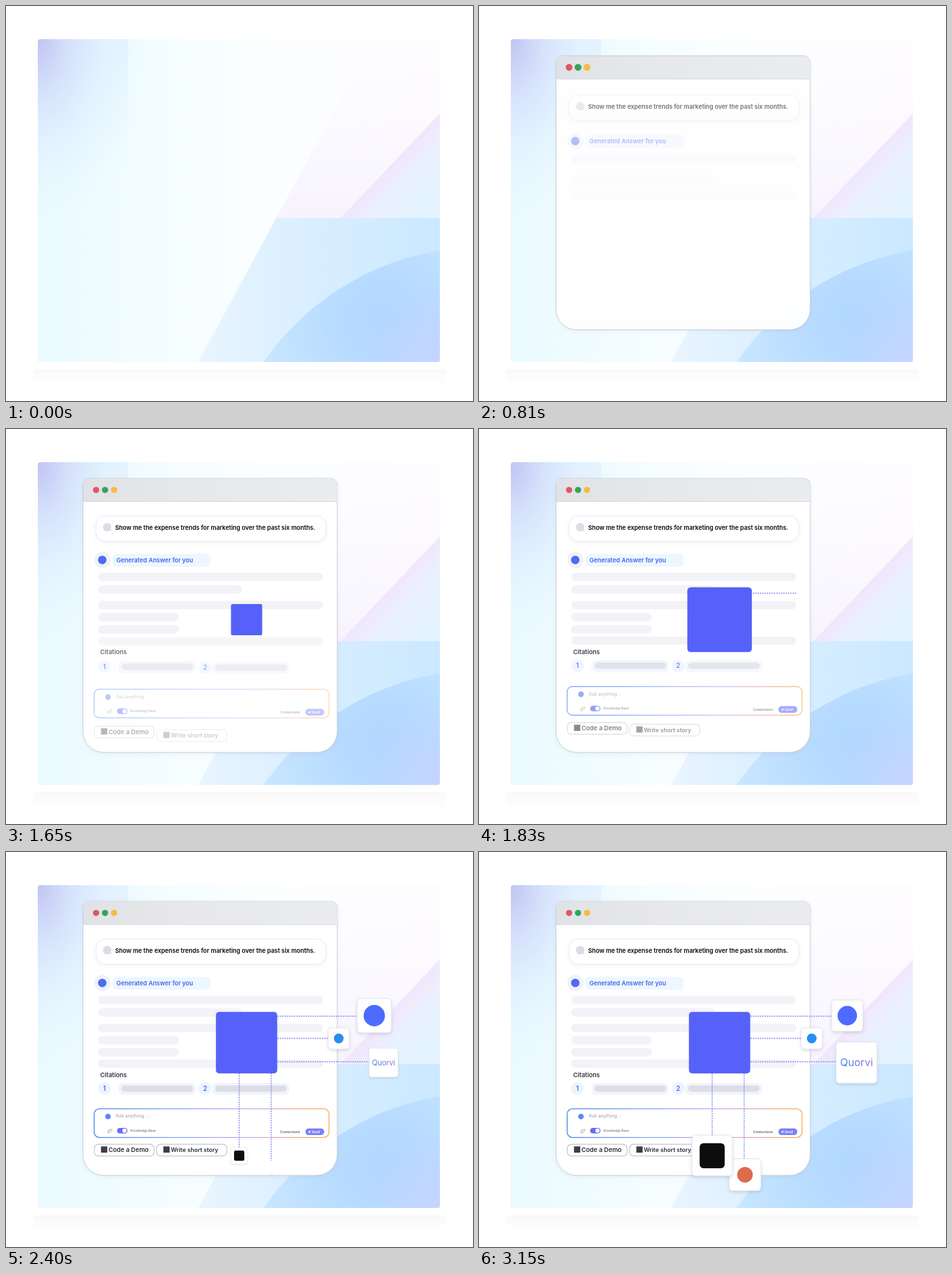
An HTML page for the animation above (3.18 s loop, 719 px wide and 607 px high).

```html
<!DOCTYPE html>
<html lang="en">
<head>
<meta charset="utf-8">
<title>Assistant window</title>
<style>
html, body { margin: 0; width: 100%; height: 100%; overflow: hidden; background: #fff; }
svg { display: block; width: 719px; height: 607px; font-family: Inter, "Open Sans", sans-serif; font-weight: 600; }
</style>
</head>
<body>
<svg id="stage" viewBox="0 0 719 607">
  <defs>
    <clipPath id="panelClip"><rect x="49" y="51" width="619" height="496" rx="4"/></clipPath>
    <linearGradient id="base"><stop stop-color="#eafaff"/><stop offset=".3" stop-color="#f3fdff"/><stop offset=".55" stop-color="#fbfeff"/><stop offset="1" stop-color="#fefcff"/></linearGradient>
    <radialGradient id="corner" gradientUnits="userSpaceOnUse" cx="0" cy="0" r="1" gradientTransform="translate(49 51) scale(170 290)">
      <stop stop-color="#c0c4f3"/><stop offset=".3" stop-color="#d5e0fb" stop-opacity=".9"/><stop offset=".6" stop-color="#dff0ff" stop-opacity=".6"/><stop offset="1" stop-color="#e6f8ff" stop-opacity="0"/>
    </radialGradient>
    <linearGradient id="strip" x2="0" y2="1"><stop stop-color="#e0edfe" stop-opacity=".75"/><stop offset="1" stop-color="#e9f9ff" stop-opacity="0"/></linearGradient>
    <linearGradient id="blush" x2="0" y2="1"><stop stop-color="#fcf9ff" stop-opacity="0"/><stop offset="1" stop-color="#f7f3fe"/></linearGradient>
    <linearGradient id="wedge" gradientUnits="userSpaceOnUse" x1="591" y1="245" x2="650" y2="301"><stop stop-color="#f1e6fc"/><stop offset=".45" stop-color="#eaf1fe"/><stop offset="1" stop-color="#e3f3ff"/></linearGradient>
    <linearGradient id="lower"><stop stop-color="#e9f5ff"/><stop offset=".5" stop-color="#d8eeff"/><stop offset="1" stop-color="#cbe8ff"/></linearGradient>
    <radialGradient id="disc" gradientUnits="userSpaceOnUse" cx="585" cy="485" r="200"><stop stop-color="#b1d7ff"/><stop offset=".35" stop-color="#b7dbff"/><stop offset="1" stop-color="#c9e7ff"/></radialGradient>
    <radialGradient id="lilac" gradientUnits="userSpaceOnUse" cx="668" cy="547" r="130"><stop stop-color="#c6d3ff"/><stop offset="1" stop-color="#c0d6ff" stop-opacity="0"/></radialGradient>
    <linearGradient id="floor" x2="0" y2="1"><stop stop-color="#f9f9f9"/><stop offset="1" stop-color="#fff"/></linearGradient>
    <linearGradient id="titleBar"><stop stop-color="#e0e2e5"/><stop offset=".4" stop-color="#e6e8ea"/><stop offset="1" stop-color="#ebecef"/></linearGradient>
    <linearGradient id="rim"><stop stop-color="#3f7ff0"/><stop offset=".35" stop-color="#7aa0fa"/><stop offset=".65" stop-color="#c9a4f2"/><stop offset="1" stop-color="#f5a94a"/></linearGradient>
    <linearGradient id="wordInk"><stop stop-color="#4285f4"/><stop offset=".6" stop-color="#8474cf"/><stop offset="1" stop-color="#7a80dd"/></linearGradient>
    <filter id="soft" x="-30%" y="-30%" width="160%" height="170%"><feDropShadow dx="0" dy="2" stdDeviation="2.5" flood-color="#5a6080" flood-opacity=".22"/></filter>
    <filter id="faint" x="-10%" y="-30%" width="120%" height="180%"><feDropShadow dx="0" dy="2" stdDeviation="3" flood-color="#8088b0" flood-opacity=".12"/></filter>
  </defs>
  <rect x="42" y="558" width="635" height="26" rx="4" fill="url(#floor)"/>
  <g clip-path="url(#panelClip)">
    <rect x="49" y="51" width="619" height="496" fill="url(#base)"/>
    <rect x="49" y="51" width="139" height="200" fill="url(#strip)"/>
    <rect x="49" y="51" width="200" height="300" fill="url(#corner)"/>
    <path d="M416 326 565 51H668V326Z" fill="url(#blush)"/>
    <path d="M515 326 668 165V326Z" fill="url(#wedge)"/>
    <path d="M296 547 416 326H668V547Z" fill="url(#lower)"/>
    <circle cx="735" cy="782" r="412" fill="url(#disc)"/>
    <rect x="538" y="417" width="130" height="130" fill="url(#lilac)"/>
  </g>
</svg>
<script>
const LOOP = 3180, STEP = 30;
const stage = document.getElementById('stage');
const parts = [];

function add(parent, tag, attrs, text) {
  const node = document.createElementNS('http://www.w3.org/2000/svg', tag);
  for (const key in attrs) node.setAttribute(key, attrs[key]);
  if (text) node.textContent = text;
  return parent.appendChild(node);
}
const group = (parent = stage) => add(parent, 'g', {});
const box = (parent, x, y, width, height, rx, fill, extra) =>
  add(parent, 'rect', { x, y, width, height, rx, fill, ...extra });
const dot = (parent, cx, cy, r, fill) => add(parent, 'circle', { cx, cy, r, fill });
const label = (parent, x, y, size, fill, text, extra) =>
  add(parent, 'text', { x, y, 'font-size': size, fill, ...extra }, text);

const progress = (t, start, span) => Math.min(1, Math.max(0, (t - start) / span));
const easeOut = p => 1 - (1 - p) ** 3;
const easeBack = p => 1 + 2.70158 * (p - 1) ** 3 + 1.70158 * (p - 1) ** 2;

// Slides up into place while fading in
function rise(start, distance = 30) {
  const g = group();
  parts.push(t => {
    const p = progress(t, start, 800);
    g.setAttribute('transform', `translate(0 ${distance * (1 - easeOut(p))})`);
    g.setAttribute('opacity', p);
  });
  return g;
}

// Scales up around (x, y) with an overshoot
function pop(parent, x, y, start, span) {
  const g = group(parent);
  parts.push(t => {
    const scale = easeBack(progress(t, start, span));
    g.setAttribute('visibility', scale > 0.001 ? 'visible' : 'hidden');
    g.setAttribute('transform', `translate(${x} ${y}) scale(${scale})`);
  });
  return g;
}

function grow(x, y, length, start, vertical) {
  const line = add(stage, 'line', { x1: x, y1: y, x2: x, y2: y, stroke: '#8b8df6', 'stroke-width': 1.6, 'stroke-dasharray': '2 1.6' });
  parts.push(t => {
    const reach = length * easeOut(progress(t, start, 400));
    line.setAttribute(vertical ? 'y2' : 'x2', (vertical ? y : x) + reach);
    line.setAttribute('visibility', reach ? 'visible' : 'hidden');
  });
}

function card(x, y, size, start) {
  const g = pop(stage, x, y, start, 750);
  box(g, -size / 2, -size / 2, size, size, 5, '#fff', { stroke: '#dfe1e8', 'stroke-width': .8, filter: 'url(#soft)' });
  return g;
}

// Window
const pane = group(), lights = group();
add(pane, 'path', { d: 'M118.5 86a10 10 0 0 1 10-10H500a10 10 0 0 1 10 10V465a32 32 0 0 1-32 32H150.5a32 32 0 0 1-32-32Z', fill: '#fff', stroke: '#c3c8d3', 'stroke-width': .9, filter: 'url(#faint)' });
add(pane, 'path', { d: 'M119 112V86a9.5 9.5 0 0 1 9.5-9.5H500a9.5 9.5 0 0 1 9.5 9.5V112Z', fill: 'url(#titleBar)' });
box(pane, 119, 111, 390.5, 1, 0, '#d6d9df');
parts.push(t => {
  const e = easeOut(progress(t, 210, 800));
  const shift = `translate(0 ${35 * (1 - e)})`;
  pane.setAttribute('transform', shift);
  pane.setAttribute('opacity', e);
  lights.setAttribute('transform', shift);
});
[['#e05766', 381], ['#35a35a', 450], ['#f8bb41', 501]].forEach(([color, start], i) =>
  dot(pop(lights, 138.7 + i * 13.8, 93.7, start, 600), 0, 0, 4.8, color));

// Question
const query = rise(360, 39);
box(query, 138.5, 133.5, 354, 39, 15, '#fff', { stroke: '#e9eaf3', filter: 'url(#faint)' });
add(query, 'path', { d: 'M159 154l3 2.5', stroke: '#d9dae6', 'stroke-width': 2 });
dot(query, 155.7, 150.8, 6.5, '#dcdce8');
label(query, 168, 154.6, 9.3, '#08080c', 'Show me the expense trends for marketing over the past six months.');

// Answer
const answer = rise(468, 34);
dot(answer, 148.5, 201.3, 12.5, '#f0f2f9');
dot(answer, 148.2, 201.2, 6.5, '#4f6bef');
box(answer, 164, 191.7, 151, 20, 6, '#edf7ff');
label(answer, 170, 204.8, 9.3, '#4661f1', 'Generated Answer for you');
[[221, 346, 490], [240.3, 221, 680], [264.3, 346, 685], [282.8, 124, 762], [301.6, 124, 830], [319, 346, 1100]]
  .forEach(([y, width, start]) => box(rise(start, 34), 142, y, width, 12.6, 6, '#f2f2f7'));

// Citations
label(rise(1075, 22), 145, 346, 9.5, '#34353f', 'Citations');
[[151.5, 173, 1160], [306.5, 317, 1230]].forEach(([x, left, start], i) => {
  const g = rise(start);
  dot(g, x, 363.5, 9.8, '#ecf4ff');
  label(g, x, 367, 10, '#4a63f0', String(i + 1), { 'text-anchor': 'middle' });
  box(g, left, 355, 119, 18, 7, '#f1f5fc');
  box(g, left + 5, 358.8, 110, 9.6, 4.8, '#dddde8');
});

// Prompt field
const prompt = rise(1300);
box(prompt, 135.7, 394.6, 361.6, 44, 8, '#fff', { stroke: 'url(#rim)', 'stroke-width': 1.3 });
dot(prompt, 157, 406.5, 4.3, '#5f86f3');
label(prompt, 169, 408.4, 7.1, '#9a9ba4', 'Ask anything ...', { 'font-weight': 400 });
add(prompt, 'path', { d: 'M157.5 430l3.6-3.6a1.2 1.2 0 0 1 1.8 1.8l-3.8 3.6a1.8 1.8 0 0 1-2.4-2.5l3.2-3.2', fill: 'none', stroke: '#8d8e96', 'stroke-width': .8 });
box(prompt, 171, 424, 16, 8.6, 4.3, '#686ef2');
dot(prompt, 182.4, 428.3, 3.2, '#fff');
label(prompt, 191.5, 430.1, 4.9, '#85868e', 'Knowledge Base');
label(prompt, 422, 431.8, 5, '#5b5c66', 'Connections');
box(prompt, 461, 424.7, 29, 10.4, 5, '#7c83f6');
add(prompt, 'path', { d: 'M464.5 430.3l4.6-2.4-1.5 4.6-1-1.8Z', fill: '#fff' });
label(prompt, 470.5, 431.7, 5.2, '#fff', 'Send');

// Suggestions
[[136, 92, 9.6, 1354, 'Code a Demo'], [232, 108, 9, 1455, 'Write short story']].forEach(([x, width, size, start, text]) => {
  const g = rise(start);
  box(g, x, 449.2, width, 18, 6, '#fff', { stroke: '#c2c4ce', 'stroke-width': 1.2 });
  box(g, x + 10.3, 452.4, 9.6, 9.6, 0, '#3c3d48');
  label(g, x + 21.7, 461.2, size, '#2b2d37', text);
});

// Connectors and hub
grow(418, 252.4, 128, 1734);
grow(418, 286.4, 85, 1862);
grow(418, 322.4, 145, 1990);
grow(359, 340, 118, 2080, true);
grow(408.3, 340, 138, 2120, true);
box(pop(stage, 370.4, 293, 1572, 600), -47.2, -47.2, 94.4, 94.4, 5, '#5561f8');

// Cards
dot(card(567, 251.5, 48, 2010), 0, 0, 15, '#4d6bfe');
dot(card(512.3, 286.5, 32.5, 2122), 0, 0, 7.5, '#2a8df0');
label(card(581.3, 323.7, 63, 2250), 0, 5.5, 16, 'url(#wordInk)', 'Quorvi', { 'text-anchor': 'middle', 'font-weight': 400 });
dot(card(409.5, 496, 49, 2391), 0, 0, 12, '#dc6b4f');
box(card(359, 466.7, 62, 2325), -19.3, -19.3, 38.6, 38.6, 6, '#0d0d0e');

const origin = performance.now();
function draw() {
  const t = (performance.now() - origin) % LOOP;
  const tick = Math.floor(t / STEP) * STEP;
  parts.forEach(update => update(tick));
  requestAnimationFrame(draw);
}
draw();
</script>
</body>
</html>
```
